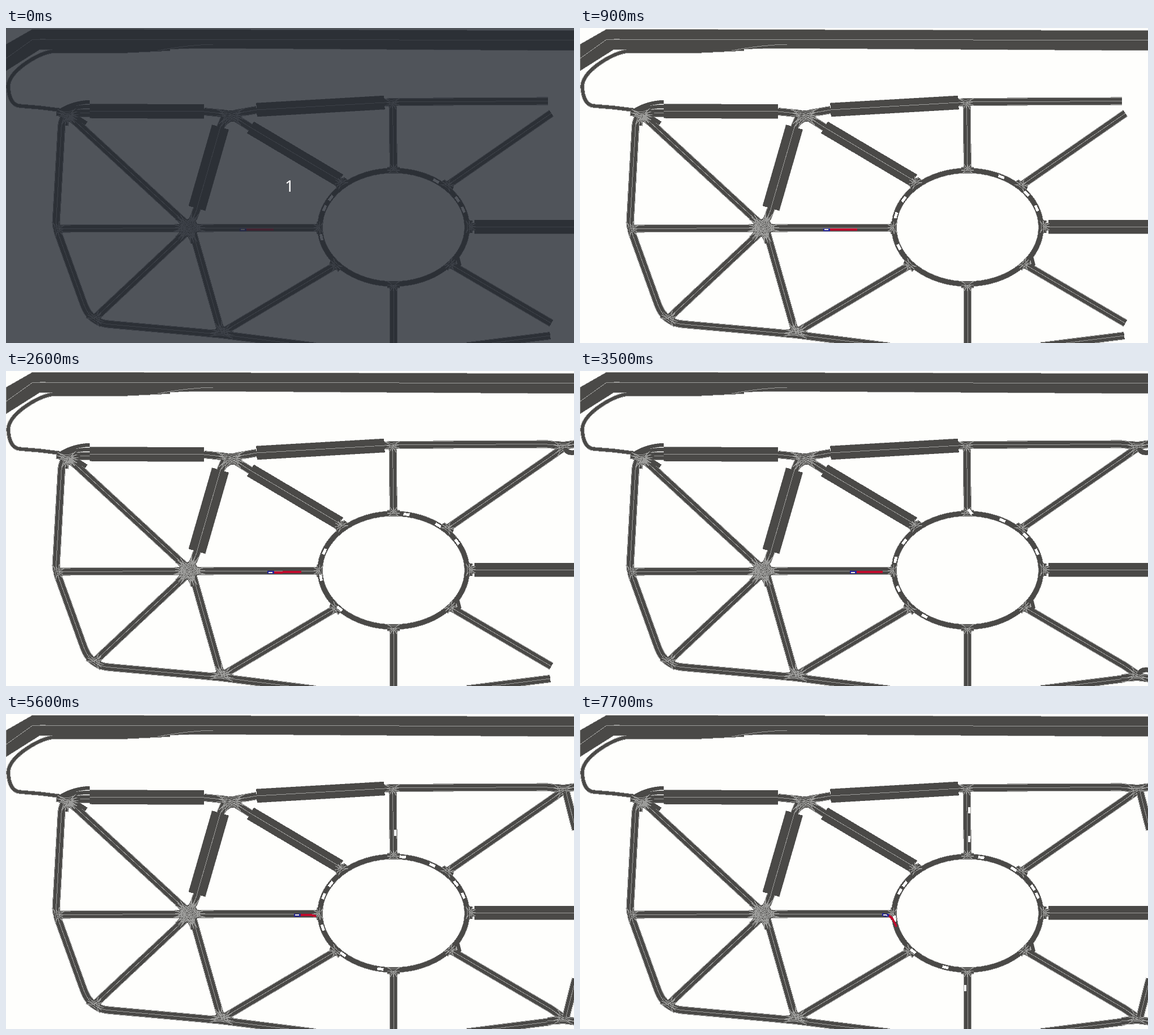
An HTML page for the animation above (8000 ms loop, 1004 by 558 pixels).

```html
<!DOCTYPE html>
<html lang="en">
<head>
<meta charset="utf-8">
<title>Roundabout traffic</title>
<style>
  html, body { margin: 0; width: 100%; height: 100%; overflow: hidden; background: #fefefc; }
  svg { display: block; width: 1004px; height: 558px; }
  path, rect { shape-rendering: crispEdges; }
  text { font: 28px "Noto Sans", "Open Sans", sans-serif; fill: #fff; text-anchor: middle; }
</style>
</head>
<body>
<svg id="stage" viewBox="0 0 1004 558"></svg>
<script>
const stage = document.getElementById('stage');
const LOOP = 8000, DARK = '#4a4947', LIGHT = '#9c9c9a';
const RING = { x: 685, y: 353, rx: 130, ry: 100.5 };

function add(parent, tag, attrs = {}) {
  const el = document.createElementNS('http://www.w3.org/2000/svg', tag);
  for (const key in attrs) el.setAttribute(key, attrs[key]);
  return parent.appendChild(el);
}

function makeLayer() {
  const root = add(stage, 'g', { fill: 'none' });
  return {
    root,
    edge: add(root, 'g', { stroke: LIGHT }),
    body: add(root, 'g', { stroke: DARK }),
    mark: add(root, 'g', { stroke: LIGHT, 'stroke-width': 1 })
  };
}

// Every two-way road remembers its ends, so that junctions can find their arms.
const roadEnds = [];

function strip(layer, d, width, border = 1) {
  add(layer.edge, 'path', { d, 'stroke-width': width + border });
  add(layer.body, 'path', { d, 'stroke-width': width });
}

function road(layer, d) {
  strip(layer, d, 11.8, 2.4);
  add(layer.mark, 'path', { d });
  const n = d.match(/[\d.]+/g).map(Number);
  const [toX, toY, lastX, lastY] = n.slice(-4);
  roadEnds.push({ x: n[0], y: n[1], toX: n[2], toY: n[3] }, { x: lastX, y: lastY, toX, toY });
}

function wideRoad(layer, d, width) {
  strip(layer, d, width);
  add(layer.mark, 'path', { d });
}

// Joins the lanes of every pair of arms: a dark lane with a light line on both sides.
function connect(layer, cx, cy, radius, targets) {
  const arms = targets.map(([x, y]) => {
    const len = Math.hypot(x - cx, y - cy), ux = (x - cx) / len, uy = (y - cy) / len;
    return s => `${(cx + ux * radius - uy * s).toFixed(1)} ${(cy + uy * radius + ux * s).toFixed(1)}`;
  });
  for (const from of arms) for (const to of arms) {
    if (from === to) continue;
    const curve = s => `M${from(-s)}Q${cx} ${cy} ${to(s)}`;
    add(layer.body, 'path', { d: curve(3), 'stroke-width': 6.5 });
    add(layer.mark, 'path', { d: curve(0) + curve(6) });
  }
}

function junction(layer, x, y, radius) {
  const arms = roadEnds.filter(end => Math.hypot(end.x - x, end.y - y) < 18);
  connect(layer, x, y, radius, arms.map(end => [end.toX, end.toY]));
}

// Road network
const base = makeLayer();

add(base.body, 'path', {
  d: 'M0 29L47 2L1004 4.5V40L340 36L270 38H60L0 76Z', fill: DARK, stroke: LIGHT, 'stroke-width': .7
});
add(base.mark, 'path', { d: 'M0 54L46 21L60 20L1004 21.5M268 40Q320 30 366 29' });
strip(base, 'M290 37L210 41L84 41Q60 44 30 66Q4 86 4 104Q6 136 24 138L60 141L100 146', 5.5, 2);

wideRoad(base, 'M148 147L350 148', 25);
wideRoad(base, 'M443 145L669 132', 24);
wideRoad(base, 'M432 176L590 270', 23.5);
wideRoad(base, 'M379 175.5L337.5 319.5', 30.5);
wideRoad(base, 'M828 352H1010', 24);

[
  'M350 148L390 152', 'M403 152L443 145', 'M402 157L432 176', 'M387 157L379 176', 'M338 319L331 338',
  'M669 132L683 131', 'M683 131L958 129.5', 'M683.5 131L685 252', 'M685 455L685 560',
  'M110 154L324 352', 'M92 355.5L324 354.5', 'M324 354.5L555 354', 'M324 357L156 515', 'M328 354L381 541',
  'M381 540L583 420', 'M780 279L964 151', 'M785 418L964 523', 'M589 269L593 275',
  'M815 563.5L962 545', 'M819 352L829 352', 'M381 543L547 564',
  'M108 153Q99 160 98 175L88.5 345L90 356', 'M90 356L93 366L137 488Q144 508 158 517',
  'M158 517Q168 524 185 525L340 539L381 543'
].forEach(d => road(base, d));

strip(base, 'M95 147Q118 132 148 131', 6);
strip(base, 'M112 150L142 169', 7);
strip(base, 'M797 402L802 421', 6);
for (const y of [139, 147, 154]) {
  strip(base, `M100 ${y / 2 + 77}Q122 ${y} 150 ${y}`, 6);
}
const { x: ringX, y: ringY, rx, ry } = RING;
strip(base, `M${ringX - rx} ${ringY}a${rx} ${ry} 0 1 1 ${2 * rx} 0a${rx} ${ry} 0 1 1 ${-2 * rx} 0`, 8.5, 1.6);

junction(base, 324, 354, 28);
junction(base, 397, 153, 26);
junction(base, 90, 356, 13);
junction(base, 157, 516, 15);
junction(base, 381, 541, 21);
junction(base, 683, 131, 13);
connect(base, 108, 154, 19, [[60, 143], [150, 140], [142, 172], [324, 352], [99, 200]]);

// Each road that ends on the ring meets both directions of its tangent.
for (const { x, y, toX, toY } of [...roadEnds]) {
  const u = (x - ringX) / rx, v = (y - ringY) / ry;
  if (Math.abs(Math.hypot(u, v) - 1) > .06) continue;
  connect(base, x, y, 11, [[toX, toY], [x + v * rx, y - u * ry], [x - v * rx, y + u * ry]]);
}

// The map's right edge loads later; its lower part mirrors the upper one.
const phases = [];
function mapPart(start, end, build) {
  const layer = makeLayer();
  build(layer);
  phases.push({ root: layer.root, start, end });
}
for (const [start, my] of [[2500, y => y], [3200, y => 674 - y]]) {
  mapPart(start, LOOP, layer => {
    road(layer, `M957 ${my(130)}L986 ${my(132)}`);
    road(layer, `M986 ${my(132)}L1008 ${my(129)}`);
    road(layer, `M963 ${my(151.5)}L987 ${my(135)}`);
    junction(layer, 986, my(134), 18);
  });
  mapPart(start, 4800, layer => strip(layer, `M988 ${my(137)}Q992 ${my(147)} 1006 ${my(144)}`, 8));
  mapPart(4800, LOOP, layer => road(layer, `M990 ${my(138)}L1007 ${my(205)}`));
}

// Vehicles leave at rest, gather speed and slow down again where they turn off the ring.
const BIRTHS = [-5050, -2350, 100, 2900, 5600, 7600];
const streams = [
  { d: 'M808.2 321.9A129.5 100.5 0 0 0 697 252.9Q688 252 688 243V100', exit: 140, speed: 24, warmUp: 2.5 },
  { d: 'M574.1 301.1A129.5 100.5 0 0 0 671.5 452.9Q681 454 681 464V600', exit: 224, speed: 28, warmUp: 3.1 }
];

const cars = streams.flatMap(stream => {
  const route = add(stage, 'path', { d: stream.d, fill: 'none' });
  return BIRTHS.map(birth => ({
    ...stream, route, birth,
    el: add(stage, 'rect', { x: -5.5, y: -2.4, width: 11, height: 4.8, fill: '#fff' })
  }));
});

function carDistance({ speed, warmUp, exit }, age) {
  const s = speed * (age - warmUp * (1 - Math.exp(-age / warmUp)));
  return s < exit ? s : exit + (s - exit) * .8;
}

const plan = add(stage, 'path', {
  d: 'M400 357.5L535 356Q549 356 553 364L560 378L566 390', fill: 'none', stroke: '#c00a2c', 'stroke-width': 4
});
const ego = add(stage, 'g');
add(ego, 'rect', { x: -6, y: -2.5, width: 12, height: 5, fill: '#24249c' });
add(ego, 'rect', { x: -4, y: -1, width: 7, height: 2, fill: '#f4f0d8' });

const egoDistance = sec => 17 + 21.5 * sec - .72 * sec * sec;
const planLength = sec => 24 + 24 / (1 + Math.exp(2 * (sec - 4.7)));

const cover = add(stage, 'g');
add(cover, 'rect', { width: 1004, height: 558, fill: '#252a32', 'fill-opacity': .8 });
add(cover, 'text', { x: 501, y: 290 }).textContent = '1';

// The picture advances in 100 ms steps and skips some: every tenth at first, later every fourth.
function heldTime(t) {
  const step = Math.floor(t / 100);
  const skipped = step > 30 ? step % 4 === 2 : step > 0 && step % 10 === 0;
  return (skipped ? step - 1 : step) * 100;
}

function place(el, route, distance) {
  const p = route.getPointAtLength(distance);
  const a = route.getPointAtLength(Math.max(0, distance - 2));
  const b = route.getPointAtLength(distance + 2);
  const angle = Math.atan2(b.y - a.y, b.x - a.x) * 180 / Math.PI;
  el.setAttribute('transform', `translate(${p.x} ${p.y}) rotate(${angle})`);
}

const show = (el, visible) => el.setAttribute('visibility', visible ? 'visible' : 'hidden');

function draw(now) {
  const t = heldTime(now % LOOP), sec = Math.max(t, 100) / 1000;
  phases.forEach(({ root, start, end }) => show(root, t >= start && t < end));
  for (const car of cars) {
    const age = sec - car.birth / 1000;
    show(car.el, age >= 0);
    place(car.el, car.route, carDistance(car, Math.max(0, age)));
  }
  const travelled = egoDistance(sec);
  place(ego, plan, travelled);
  plan.setAttribute('stroke-dasharray', `0 ${travelled + 6} ${planLength(sec)} 999`);
  show(cover, t < 100);
}

const begin = performance.now();
function tick() {
  draw(performance.now() - begin);
  requestAnimationFrame(tick);
}
tick();
</script>
</body>
</html>
```
